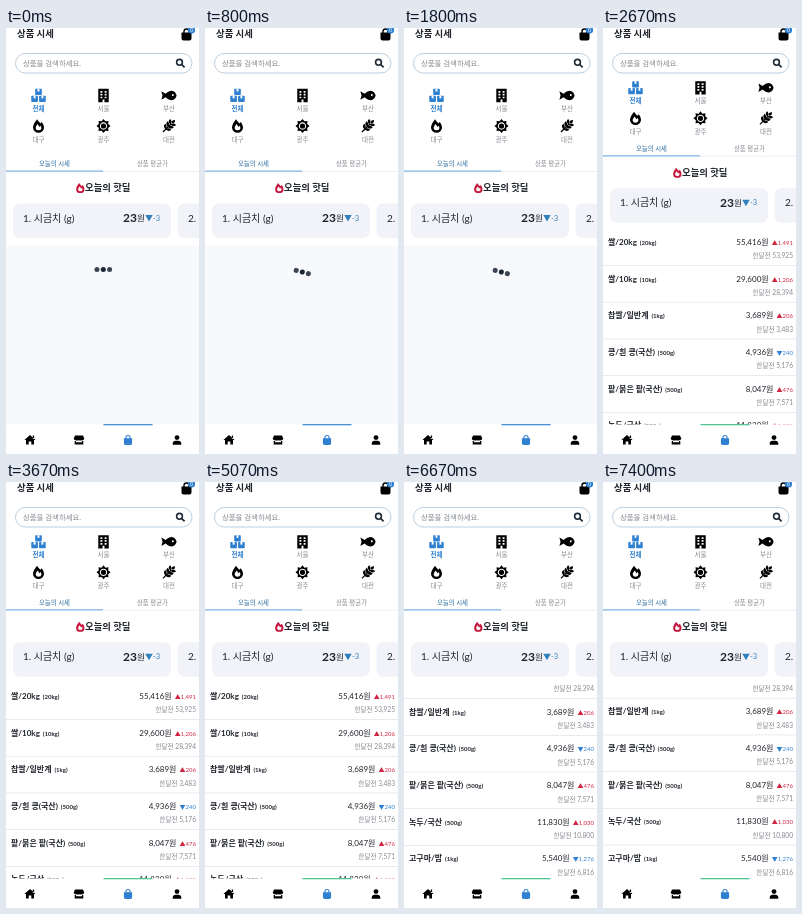
Write an HTML page that moves like this. It is 193 px wide and 426 px high and loops after 7.47 s.

```html
<!DOCTYPE html>
<html lang="ko">
<head>
<meta charset="utf-8">
<style>
html, body { margin: 0; width: 100%; height: 100%; overflow: hidden; background: #fff; }
svg { display: block; width: 100vw; height: 100vh; }
text { font-family: Lato, "Noto Sans CJK KR", "Noto Sans CJK", sans-serif; white-space: pre; }
.b { font-weight: 700; }
.m { text-anchor: middle; }
.e { text-anchor: end; }
</style>
</head>
<body>
<svg id="stage" viewBox="0 0 193 426"></svg>
<script>
const LOOP = 7470, LOADED = 2600, SPIN_START = 129;
const INK = '#20242c', BLUE = '#2f80d0', RED = '#cf2540', GRAY = '#858a90';
const PITCH = 36.7;

const items = [
  ['쌀/20kg', '20kg', 55416, 53925],
  ['쌀/10kg', '10kg', 29600, 28394],
  ['찹쌀/일반계', '1kg', 3689, 3483],
  ['콩/흰 콩(국산)', '500g', 4936, 5176],
  ['팥/붉은 팥(국산)', '500g', 8047, 7571],
  ['녹두/국산', '500g', 11830, 10800],
  ['고구마/밤', '1kg', 5540, 6816]
];

// y is the vertical middle of the line
const text = (x, y, size, body, fill = INK, cls = '') =>
  `<text x="${x}" y="${y + size * .36}" font-size="${size}" fill="${fill}" class="${cls}">${body}</text>`;
const span = (size, body, fill, cls = '') =>
  `<tspan font-size="${size}" fill="${fill}" class="${cls}">${body}</tspan>`;
const rect = (x, y, w, h, fill, r = 0, more = '') =>
  `<rect x="${x}" y="${y}" width="${w}" height="${h}" rx="${r}" fill="${fill}" ${more}/>`;
const path = (d, fill, more = '') => `<path d="${d}" fill="${fill}" fill-rule="evenodd" ${more}/>`;
const at = (x, y, body, scale = 1) => `<g transform="translate(${x} ${y}) scale(${scale})">${body}</g>`;
const box = (x, y, w, h) => `M${x} ${y}h${w}v${h}h${-w}z`;
const num = n => n.toLocaleString('en-US');

function star(points, outer, inner) {
  const p = [];
  for (let i = 0; i < points * 2; i++) {
    const a = i * Math.PI / points, r = i % 2 ? inner : outer;
    p.push((r * Math.sin(a)).toFixed(2) + ' ' + (-r * Math.cos(a)).toFixed(2));
  }
  return 'M' + p.join('L') + 'Z';
}

const flame = 'M-1.5-7C-.5-5 1-4 2-2.6L3.3-4.3C4.8-2.5 5.8-.3 5.8 1.6A5.8 5.4 0 0 1-5.8 1.6C-5.8-1.2-3.6-4.2-1.5-7Z' +
  'M-.8-2C-2-.4-3 .8-3 2.3A3.1 2.8 0 0 0 3.1 2.3C3.1 1.3 2.7.5 2.2-.2L1 1Z';
const bag = 'M-5-2H5V4Q5 6 3 6H-3Q-5 6-5 4ZM-3.2-2V-3A3.2 3.2 0 0 1 3.2-3V-2H1.8V-3A1.8 1.8 0 0 0-1.8-3V-2Z';

const icons = {
  boxes: [[-3.5, -7], [-7.6, .2], [.6, .2]].map(([x, y]) =>
    rect(x, y, 7, 6.6, BLUE, .8) + rect(x + 2.5, y, 2, 2.8, '#fff')).join(''),
  building: path(box(-5.5, -7, 11, 14) +
    [-4.8, -1.8, 1.2].map(y => box(-3.2, y, 2, 1.8) + box(1.2, y, 2, 1.8)).join('') + box(-1, 4.2, 2, 2.8), '#000'),
  fish: path('M-8-4.5L-3.6-1.8C-1.5-4 1-5 3-5 5.5-5 7.5-2.5 8 0 7.5 2.5 5.5 5 3 5 1 5-1.5 4-3.6 1.8L-8 4.5-6.8 0ZM4-1.6a1 1 0 1 0 .1 0z', '#000'),
  flame: path(flame, '#000'),
  sun: path(star(8, 7.4, 5.3), '#000') +
    '<circle r="3.3" stroke="#fff" stroke-width="1.1"/>',
  wheat: `<g transform="rotate(45)"><path d="M0-3V9" stroke="#000" stroke-width="1.3"/>` +
    [-2.2, 1.4, 5].map(y => path(`M0 ${y}C-4.6 ${y}-4.6 ${y - 3}-4.3 ${y - 4}C-1 ${y - 3.6} 0 ${y - 2} 0 ${y}C0 ${y - 2} 1 ${y - 3.6} 4.3 ${y - 4}C4.6 ${y - 3} 4.6 ${y} 0 ${y}Z`, '#000')).join('') +
    path('M0-4.3Q-3-6 0-9 3-6 0-4.3', '#000') + '</g>'
};

const categories = [['전체', 'boxes'], ['서울', 'building'], ['부산', 'fish'],
  ['대구', 'flame'], ['광주', 'sun'], ['대전', 'wheat']].map(([label, icon], i) => {
  const x = [32.5, 97.5, 163][i % 3], y = i < 3 ? 67.5 : 98;
  return at(x, y, icons[icon], .95) +
    text(x, y + 13.3, 6.5, label, i ? GRAY : BLUE, i ? 'm' : 'm b');
}).join('');

const header = text(11, 6, 9.4, '상품 시세', INK, 'b') +
  at(180.5, 6.5, path(bag, '#000')) +
  '<circle cx="185.5" cy="2" r="3.6" fill="#2f80d0"/>' + text(185.5, 2, 5, '0', '#fff', 'm') +
  rect(9.5, 25.5, 176.5, 19.5, '#fff', 9.7, 'stroke="#bccfdf"') +
  text(17, 35.2, 7.4, '상품을 검색하세요.', GRAY) +
  '<g fill="none" stroke="#1d2b38" stroke-width="1.6"><circle cx="173.5" cy="34.3" r="2.9"/><path d="M175.6 36.4L178.6 39.4"/></g>';

const deals = text(48.5, 136, 6.4, '오늘의 시세', '#286b9e', 'm') +
  text(146.5, 136, 6.4, '상품 평균가', GRAY, 'm') +
  rect(97, 143, 96, .6, '#e1e4e8') + rect(0, 142.6, 97, 1, '#5b9fdb') +
  at(74.3, 160, path(flame, '#c5173c'), .72) +
  text(79, 160, 9.4, '오늘의 핫딜', INK, 'b') +
  rect(7, 175.5, 158, 34.5, '#f2f3f8', 7) + rect(171.5, 175.5, 158, 34.5, '#f2f3f8', 7) +
  text(17, 190, 10, '1. 시금치 (g)') + text(182, 190, 10, '2. 상추 (g)') +
  text(117, 189.7, 12, '23', INK, 'b') + text(131, 190, 8.5, '원') +
  path('M139.3 187h7.4l-3.7 6.4z', '#2f7fba') + text(147, 190, 7.5, '-3', '#2f7fba');

const rows = items.map(([name, unit, now, before], i) => {
  const y = 214 + i * PITCH, up = now > before;
  const diff = (up ? '▲' : '▼') + num(Math.abs(now - before));
  return text(5, y, 8, name + span(6, '  (' + unit + ')', INK), INK, 'b') +
    text(190, y, 8, num(now) + '원' + span(6, '  ' + diff, up ? RED : BLUE), INK, 'e') +
    text(190, y + 14, 6.6, '한달전 ' + num(before), GRAY, 'e') +
    rect(0, y + 23.2, 193, .7, '#dde2ea');
}).join('');

const nav = rect(0, 396.5, 193, 30, '#fff') +
  '<rect id="mark" x="97.5" y="396" width="49" height="1.3"/>' +
  at(24, 412, path('M0-5L5.6 0H4V4.6H1.3V1.4H-1.3V4.6H-4V0H-5.6ZM2.8-4.5H4.1V-1H2.8Z', '#000')) +
  at(73, 412, path('M-4-4.5H4L5.3-1.2Q4.8.4 3.2.2 1.6.8 0 .2-1.6.8-3.2.2-4.8.4-5.3-1.2ZM-4.3.9H-3V2.3H3V.9H4.3V4.6H-4.3Z', '#000')) +
  at(122, 412, path(bag, BLUE), .82) +
  at(171, 412, '<circle cy="-2.4" r="2.4"/>' + path('M-4.3 4.7V3.6A3 3 0 0 1-1.3.8H1.3A3 3 0 0 1 4.3 3.6V4.7Z', '#000'));

const loader = [-6.3, 0, 6.3].map(x => `<circle cx="${x}" r="2.5" fill="#1c2536" opacity="${x ? .85 : 1}"/>`).join('');

const $ = id => document.getElementById(id);
$('stage').innerHTML = rect(0, 0, 193, 426, '#fff') +
  '<clipPath id="view"><rect y="200" width="193" height="200"/></clipPath>' +
  `<g id="wait">${rect(0, 218, 193, 179, '#f8f9fc')}<g id="spin">${loader}</g></g>` +
  `<g id="list" clip-path="url(#view)"><g id="rows">${rows}</g></g>` +
  `<g id="deals">${deals}</g><g id="cats">${categories}</g>` + header + nav;

const curve = (a, b, s) => 3 * (1 - s) ** 2 * s * a + 3 * (1 - s) * s * s * b + s ** 3;
function swing(x) {
  let lo = 0, hi = 1;
  for (let i = 0; i < 24; i++) {
    const mid = (lo + hi) / 2;
    if (curve(.7, .22, mid) < x) lo = mid; else hi = mid;
  }
  return curve(-.13, .86, lo);
}

function draw() {
  const t = performance.now() % LOOP, loaded = t >= LOADED;
  $('wait').style.display = loaded ? 'none' : '';
  $('list').style.display = loaded ? '' : 'none';
  $('cats').setAttribute('transform', `translate(0 ${loaded ? -7.7 : 0})`);
  $('deals').setAttribute('transform', `translate(0 ${loaded ? -15.2 : 0})`);
  $('mark').setAttribute('fill', loaded ? '#55c596' : '#4a90d6');

  // half a turn every 500 ms
  const turn = Math.max(0, t - SPIN_START) / 500;
  const angle = 180 * (Math.floor(turn) + swing(turn % 1));
  $('spin').setAttribute('transform', `translate(97.3 ${t < SPIN_START ? 241.5 : 244}) rotate(${angle})`);

  const u = Math.min(1, Math.max(0, (t - 5100) / 1650));
  $('rows').setAttribute('transform', `translate(0 ${-58 * u * u * (3 - 2 * u)})`);
  requestAnimationFrame(draw);
}
draw();
</script>
</body>
</html>
```
